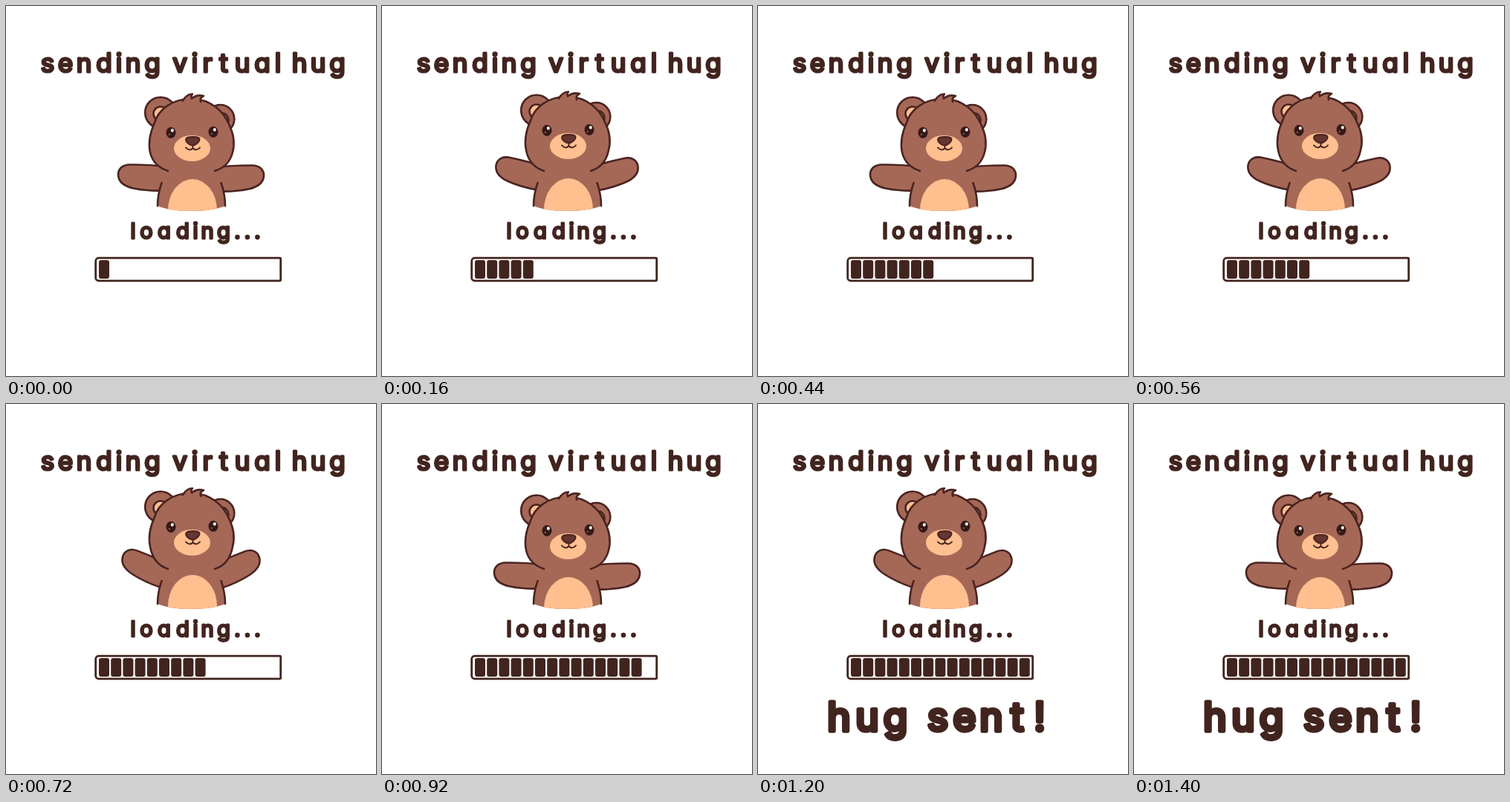
An HTML page with a canvas for the animation above (1440 ms loop, 498 by 498 pixels).

```html
<!DOCTYPE html>
<html lang="en">
<head>
<meta charset="utf-8">
<title>Sending virtual hug</title>
<style>
  html, body { margin: 0; width: 100%; height: 100%; overflow: hidden; background: #fff; }
  canvas, svg { position: absolute; left: 0; top: 0; width: 498px; height: 498px; }
  text {
    font-family: Inter, Roboto, sans-serif;
    font-weight: 400;
    font-feature-settings: "cv11";
    text-anchor: middle;
    fill: #42241f;
    stroke: #42241f;
    stroke-linejoin: round;
    stroke-linecap: round;
  }
</style>
</head>
<body>
<canvas id="stage" width="498" height="498"></canvas>
<svg viewBox="0 0 498 498">
  <text y="88.5" font-size="35" stroke-width="3.2" x="56 80 105 132 152 171 197 215 234 254 271 293 318 345 366 378 395 420 446">sending virtual hug</text>
  <text y="313" font-size="29" stroke-width="2.9" x="171 189 213 238 255 271 293 311.5 325 338.5">loading...</text>
  <text id="sent" y="440" font-size="53" stroke-width="5.6" x="109 147 185 215 242 278 314 349 379">hug sent!</text>
</svg>
<script>
const ctx = document.getElementById('stage').getContext('2d');
const sent = document.getElementById('sent');

const LOOP = 1440, STEP = 40, SENT_AT = 1000;
const LINE = '#4a2421', FUR = '#a56857', PEACH = '#ffbf8f', INK = '#42241f';

// head lift in px, arm turn in degrees, belly lift in px
const DOWN = { lift: 0, turn: 0, belly: 0 };
const MID = { lift: -3, turn: 12, belly: -1 };
const UP = { lift: -5, turn: 21, belly: -3 };
const POSES = [DOWN, MID, UP, MID];

const shapes = {
  arm: 'M214 216 C200 214 184 213.5 167 213.5 C156 213.5 150.5 220 151 228 C152 238 160 243 172 245.5 C184 248 198 249 212 248.5',
  body: 'M216 214 L209 238 C206 248 204 258 204 269 C214 273 226 276 249 276 C272 276 285 273 295 269 C295 258 293 248 290 238 L283 214 Z',
  sides: 'M209.5 238 C206 248 204 258 204 269 M289.5 238 C293 248 295 258 295 269',
  tuft: 'M238 127.5 C241 122 246 118.5 251 118.5 C249 121 249 122 250 124.5 C254 121 260 119.5 266 121 C262 123 261 126 262 129',
  nose: 'M243 178 C246 175.5 257 175.5 260 178 C262 182 255 187.5 251.5 187.5 C247 187.5 240 182 243 178 Z',
  mouth: 'M251.5 187 L251.5 191.5 M242 190.5 C245 194.5 249 194 251.5 191.5 C254 194 258 194.5 261 190.5'
};
for (const key in shapes) shapes[key] = new Path2D(shapes[key]);

// The chin stays put while the rest of the outline rises
function headOutline(lift) {
  return new Path2D(`M218 222 C206 218 197 210 194 ${197 + lift}
    c-3 -14 1 -29 6 -40 c5 -17 23 -32 49 -32 c28 0 44 18 51 34 c6.5 13 8 27 5 38
    C302 209 294 218 281 222`);
}

function draw(path, fill, stroke, width = 2.6) {
  if (fill) { ctx.fillStyle = fill; ctx.fill(path); }
  if (stroke) { ctx.strokeStyle = stroke; ctx.lineWidth = width; ctx.stroke(path); }
}

function oval(x, y, rx, ry, fill, stroke) {
  const path = new Path2D();
  path.ellipse(x, y, rx, ry, 0, 0, Math.PI * 2);
  draw(path, fill, stroke);
}

function box(x, y, w, h, r, fill, stroke, width) {
  const path = new Path2D();
  path.roundRect(x, y, w, h, r);
  draw(path, fill, stroke, width);
}

function drawArm(turn, mirrored) {
  ctx.save();
  if (mirrored) { ctx.translate(498, 1); ctx.scale(-1, 1); }
  ctx.translate(215, 233);
  ctx.rotate(turn * Math.PI / 180);
  ctx.translate(-215, -233);
  draw(shapes.arm, FUR, LINE);
  ctx.restore();
}

function drawEye(x, y) {
  oval(x, y, 6.5, 7.5, '#351916');
  oval(x + 1.8, y - 3, 2, 2.2, '#fff');
  oval(x - 2.2, y + 2.6, 1, 1, '#9a7670');
}

function drawHead(lift) {
  ctx.save();
  ctx.translate(0, lift);
  oval(208, 143.5, 20.8, 20.8, FUR, LINE);
  oval(208, 145, 9.5, 9.5, PEACH, LINE);
  oval(288.5, 152, 18.8, 19, FUR, LINE);
  oval(290, 154, 9.5, 10, FUR, LINE);
  ctx.restore();

  draw(headOutline(lift), FUR, LINE);

  ctx.save();
  ctx.translate(0, lift);
  draw(shapes.tuft, FUR, LINE);
  oval(250.5, 191.5, 24.5, 17.5, PEACH);
  draw(shapes.nose, '#653630', LINE, 2.2);
  draw(shapes.mouth, null, LINE, 2);
  drawEye(222, 170.5);
  drawEye(279, 169.5);
  ctx.restore();
}

function drawBear({ lift, turn, belly }) {
  drawArm(turn, false);
  drawArm(turn, true);
  draw(shapes.body, FUR);

  ctx.save();
  ctx.clip(shapes.body);
  oval(251, 275 + belly, 33, 42, PEACH);
  ctx.restore();
  draw(shapes.sides, null, LINE);

  drawHead(lift);
}

// Fills to seven blocks, pauses, then fills the rest
function blockCount(tick) {
  return tick < 17 ? Math.min(tick + 1, 7) : Math.min(tick - 9, 15);
}

function drawBar(count) {
  box(120.7, 339.2, 249, 30.6, [4, 1, 1, 4], null, INK, 2.8);
  for (let i = 0; i < count; i++) box(125 + i * 16.2, 342, 14, 25, 3, INK);
}

function render(time) {
  const tick = Math.floor(time % LOOP / STEP);
  ctx.clearRect(0, 0, 498, 498);
  ctx.lineCap = ctx.lineJoin = 'round';
  drawBear(POSES[Math.floor((tick + 1) / 3) % POSES.length]);
  drawBar(blockCount(tick));
  sent.style.visibility = tick * STEP >= SENT_AT ? 'visible' : 'hidden';
}

const start = performance.now();
function loop() {
  render(performance.now() - start);
  requestAnimationFrame(loop);
}
loop();
</script>
</body>
</html>
```
